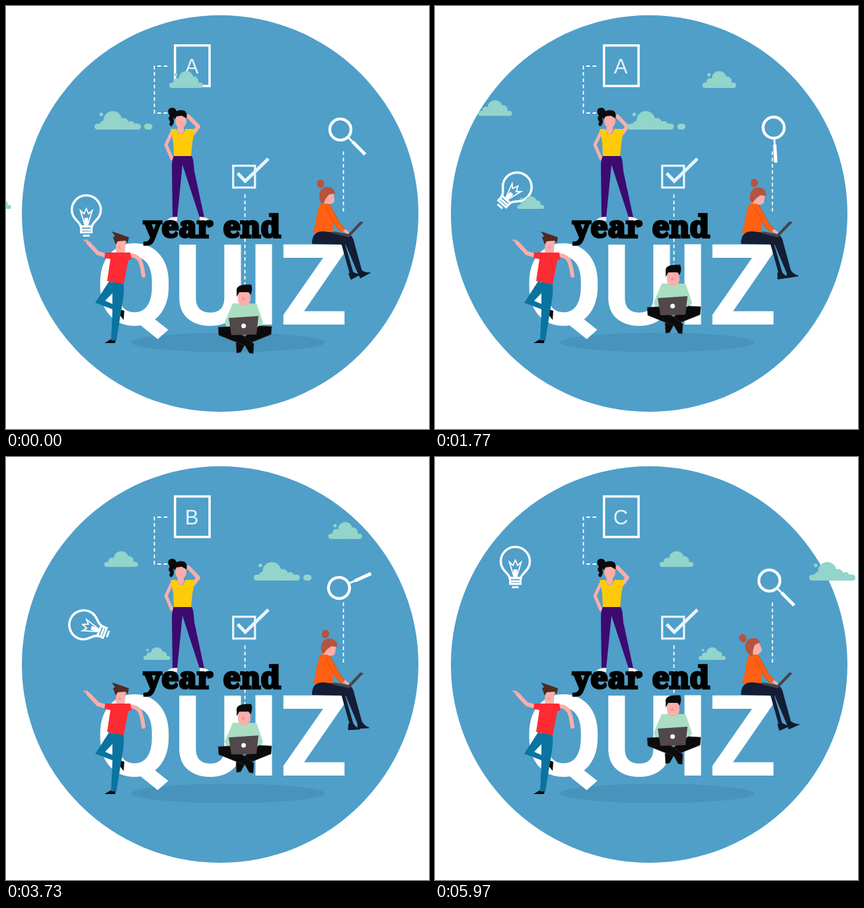
Recreate the animation shown at these times as an HTML page. Size 640 by 640 pixels, loop 6010 ms.

```html
<!DOCTYPE html>
<html lang="en">
<head>
<meta charset="utf-8">
<title>Year end quiz</title>
<style>
html, body { margin: 0; width: 100%; height: 100%; overflow: hidden; background: #fff; }
svg { display: block; width: 100vw; height: 100vh; }
.line { fill: none; stroke: #fff; }
.dash { fill: none; stroke: #fff; stroke-width: 1.8; stroke-dasharray: 5.5 4; }
.skin { fill: #fbaeaa; }
.limb { fill: none; stroke: #fbaeaa; stroke-linejoin: round; stroke-linecap: round; }
.quiz { font: 700 171px Roboto, sans-serif; fill: #fff; }
.year { font: 900 46px "Noto Serif", serif; fill: #000; stroke: #000; stroke-width: 3.6; }
.grade { font: 31px "Liberation Sans", sans-serif; fill: #e6f2f9; text-anchor: middle; }
.cloud { fill: #93d4cb; }
.ink { fill: #0b0a0c; }
</style>
</head>
<body>
<svg viewBox="0 0 640 640">
  <defs>
    <g id="puff">
      <rect y="18" width="51" height="8" rx="4"/>
      <circle cx="12" cy="17" r="6"/>
      <circle cx="25.5" cy="11.5" r="11"/>
      <circle cx="37" cy="16" r="7.5"/>
    </g>
    <path id="shoe" d="M-4 -1 L3 -1 Q6 5 13 8 V9 H-5Z" fill="#111a2e"/>
    <path id="leg" class="ink" stroke="#383338" stroke-width=".6" d="M321 486 L340 485 L375 511 L374 526 L368 525 L362 514 L322 498Z"/>
  </defs>

  <circle cx="324" cy="314" r="300" fill="#4f9fc9"/>
  <ellipse cx="336" cy="509" rx="147" ry="14.5" fill="#4793bc"/>
  <text class="quiz" x="135.5 252.5 365 413.5" y="482">QUIZ</text>

  <path class="dash" d="M244 91 H224.5 V162 H247"/>
  <path class="dash" d="M361.5 285 V432"/>
  <path class="dash" d="M510.5 220 V314"/>
  <rect class="line" x="255.7" y="59.7" width="52.3" height="61.3" stroke-width="3.5"/>
  <text class="grade" x="281" y="102">A</text>
  <text class="grade" x="281" y="102">B</text>
  <text class="grade" x="281" y="102">C</text>
  <rect x="343.7" y="241.7" width="33" height="33" fill="none" stroke="#e9f4fa" stroke-width="3.2"/>
  <path d="M350.5 253 L362 265 L397 231" fill="none" stroke="#e9f4fa" stroke-width="5"/>

  <g id="bulb" class="line" stroke-width="3.5">
    <path d="M-8.5 21 C-9 14 -22 10 -22 -4 A22 22 0 0 1 22 -4 C22 10 9 14 8.5 21Z"/>
    <path d="M-8 22 V30 H8 V22 M-8 26 H8 M-5 35 H5" stroke-width="3"/>
    <path d="M-2.5 18 L-9 -3 L-3.5 2 L0 -6 L3.5 2 L9 -3 L2.5 18" stroke-width="1.8"/>
    <path d="M0 8 V20" stroke-width="6"/>
  </g>

  <g id="lens" class="line">
    <circle cx="-10" r="16" stroke-width="4.3"/>
    <path d="M6 0 H17" stroke-width="2.8"/>
    <path d="M16 0 H43" stroke-width="5"/>
  </g>

  <!-- standing woman -->
  <path class="ink" d="M253 154 C244 153 244 161 248 166 C245 169 246 173 249 175 C246 178 247 181 250 182 C254 179 255 174 253 170 C260 167 260 156 253 154Z"/>
  <path class="limb" stroke-width="6" d="M283 193 L291 182.5 L276 167"/>
  <path class="limb" stroke-width="5" d="M251 191 L242 210 L251 231"/>
  <path class="skin" d="M260 180 H269 V190 L264 195 L259 189Z"/>
  <path fill="#ffcb08" d="M249 186 H258 C261 197 268 197 271 186 H286 L282 206 L280 228 H254 L253 206Z"/>
  <ellipse class="skin" cx="264.5" cy="174" rx="8.5" ry="10.5"/>
  <path class="ink" d="M255 172 C251 159 262 156 268 158 C274 159 274 166 273 170 L266 166 L258 167Z"/>
  <path fill="#3d0a70" d="M254 227 H281 C284 232 284 240 285 250 L300 320 H293 L267 240 L259 320 H252 L251 245 C251 235 252 231 254 227Z"/>
  <path fill="#f6eeee" d="M244 325 C246 320 252 319 259 319 V325Z M293 325 V319 C301 319 306 321 308 325Z"/>

  <!-- man in red -->
  <path class="limb" stroke-width="6" d="M153 378 L139 374 L125 359"/>
  <path class="limb" stroke-width="2" d="M126 360 L118 354 M126 359 L122 354"/>
  <path class="limb" stroke-width="6" d="M188 377 C202 378 204 387 206 396 L208 408"/>
  <path class="skin" d="M167 351 H181 L180 372 Q173 379 166 372Z"/>
  <path fill="#e98f8b" d="M171 362 L174 367 H171Z"/>
  <path fill="#52291f" d="M166 361 L162 350 L165 348 L160 341 L172 345 L186 350 L184 359 L181 355 L169 356Z"/>
  <path class="ink" d="M172 459 L179 461 L178 475 L171 466Z M149 510 L159 504 L166 505 L165 510Z"/>
  <path fill="#0a73a0" d="M161 417 L178 420 Q179 436 176 450 L167 506 H159 L161 462Z"/>
  <path fill="#0a73a0" d="M157 415 L135 449 L172 463 L175 457 L150 446 L169 426Z"/>
  <path fill="#ff2b33" d="M150 373 H188 L190 383 L185 385 L178 421 L153 416 L158 383 L149 381Z"/>

  <!-- man with laptop -->
  <g id="coder">
    <path class="skin" d="M355 444 H366 V456 H355Z"/>
    <path fill="#a9dec3" d="M343 450 H354 Q360 457 367 450 H379 L389 479 L384 488 H334 L331 478Z"/>
    <path class="skin" d="M351 431 H369 L370 444 Q369 453 360 453 Q351 453 351 444Z"/>
    <path fill="#e98f8b" d="M359 439 L361 445 H357Z"/>
    <path class="ink" d="M349 440 V432 C348 423 355 421 371 421.5 Q374 429 370 437 L367 433 H353Z"/>
    <use href="#leg" transform="matrix(-1 0 0 1 723 -1)"/>
    <use href="#leg"/>
    <path fill="#50484a" d="M337 472 L382 469 L379 497 L341 498Z"/>
    <circle cx="359.5" cy="484" r="3.5" fill="#fff"/>
  </g>

  <!-- seated woman -->
  <path class="skin" d="M479 291 H489 V302 H478Z"/>
  <path fill="#ff6013" d="M476 299 H489 L496 318 L494 343 H464 C470 330 469 310 476 299Z"/>
  <g id="head">
    <path class="skin" d="M480 283 H496 L497 295 Q494 301 486 299 L480 296Z"/>
    <path fill="#b7533f" d="M474 287 C474 270 497 270 498 284 L489 285 L484 291 L480 300 Q474 296 474 287Z"/>
    <ellipse cx="476" cy="269" rx="5.5" ry="6.5" fill="#b7533f"/>
  </g>
  <path fill="#141d33" d="M500 349 L512 357 L526 405 H520 L508 362Z"/>
  <path fill="#141d33" d="M463 360 C463 345 470 341 480 341 L516 345 C525 346 526 354 528 362 L539 402 L532 404 L514 361Z"/>
  <path class="limb" stroke-width="4" d="M503 333 L517 343"/>
  <path fill="none" stroke="#e04d0a" stroke-width="8" d="M487 303 L502 331 L510 340"/>
  <path fill="none" stroke="#ff6013" stroke-width="6.5" d="M487 303 L502 331 L510 340"/>
  <path fill="#46444a" d="M494 344 L496 341 L518 345 L536 326 L541 327 L519 350Z"/>
  <use class="foot" href="#shoe" data-x="522" data-y="404"/>
  <use class="foot" href="#shoe" data-x="536" data-y="402"/>

  <text class="year" y="350"><tspan x="208.5">year</tspan> <tspan x="328.5">end</tspan></text>

  <g id="clouds" class="cloud">
    <g transform="translate(247 98)"><use href="#puff"/><circle cx="10" cy="6" r="2.5"/></g>
    <use href="#puff" transform="translate(-92 142) scale(1 .93)"/>
    <g transform="translate(-33 287.5) scale(.8 .75)"><use href="#puff"/><circle cx="8" cy="6" r="2.5"/></g>
    <g transform="translate(134 159)">
      <rect y="19" width="70" height="9" rx="4.5"/>
      <rect x="75" y="19" width="12.5" height="9" rx="4.5"/>
      <circle cx="14" cy="21" r="6.5"/>
      <circle cx="27.5" cy="14" r="14"/>
      <circle cx="44" cy="18.5" r="8"/>
      <circle cx="55" cy="21" r="6"/>
      <circle cx="63" cy="23" r="4.5"/>
      <circle cx="10" cy="5" r="2.8"/>
    </g>
  </g>
</svg>
<script>
const LOOP = 6010, HALF = LOOP / 2;
const $ = id => document.getElementById(id);
const grades = document.querySelectorAll('.grade');
const feet = document.querySelectorAll('.foot');

// S-curve from 0 to 1; a positive bias moves its steep part earlier.
function ease(u, bias) {
  const done = Math.exp(bias) * u ** 2.4;
  return done / (done + (1 - u) ** 2.4);
}

// Two eased legs with a rest at half time.
const travel = (from, mid, to, bias1, bias2) => t => t < HALF
  ? from + (mid - from) * ease(t / HALF, bias1)
  : mid + (to - mid) * ease(t / HALF - 1, bias2);

const drift = travel(0, 209, 432, .25, .95);
const spin = travel(0, 276, 360, -2.6, 1.2);
const bulbY = travel(312.5, 262, 162, 0, .1);
const rise = travel(0, 47, 61, -.3, -.1);
const nod = travel(0, 17, -21, .4, .4);
const toe = travel(-28, 0, -24, 0, 1);

const fade = (t, mid) => Math.min(1, Math.max(0, (t - mid) / 160 + .5));
const place = (el, x, y, angle = 0) => el.setAttribute('transform', `translate(${x} ${y}) rotate(${angle})`);

function draw() {
  const t = performance.now() % LOOP;
  const turn = spin(t), b = fade(t, LOOP / 3), c = fade(t, LOOP * 2 / 3);
  place($('clouds'), drift(t), 0);
  place($('bulb'), 121.5, bulbY(t), turn);
  place($('lens'), 513, 194, 45 + turn);
  place($('coder'), 0, -rise(t));
  $('head').setAttribute('transform', `rotate(${nod(t)} 485 299)`);
  feet.forEach(f => place(f, f.dataset.x, f.dataset.y, toe(t)));
  [1 - b, b - c, c].forEach((o, i) => grades[i].setAttribute('opacity', o));
  requestAnimationFrame(draw);
}
draw();
</script>
</body>
</html>
```
